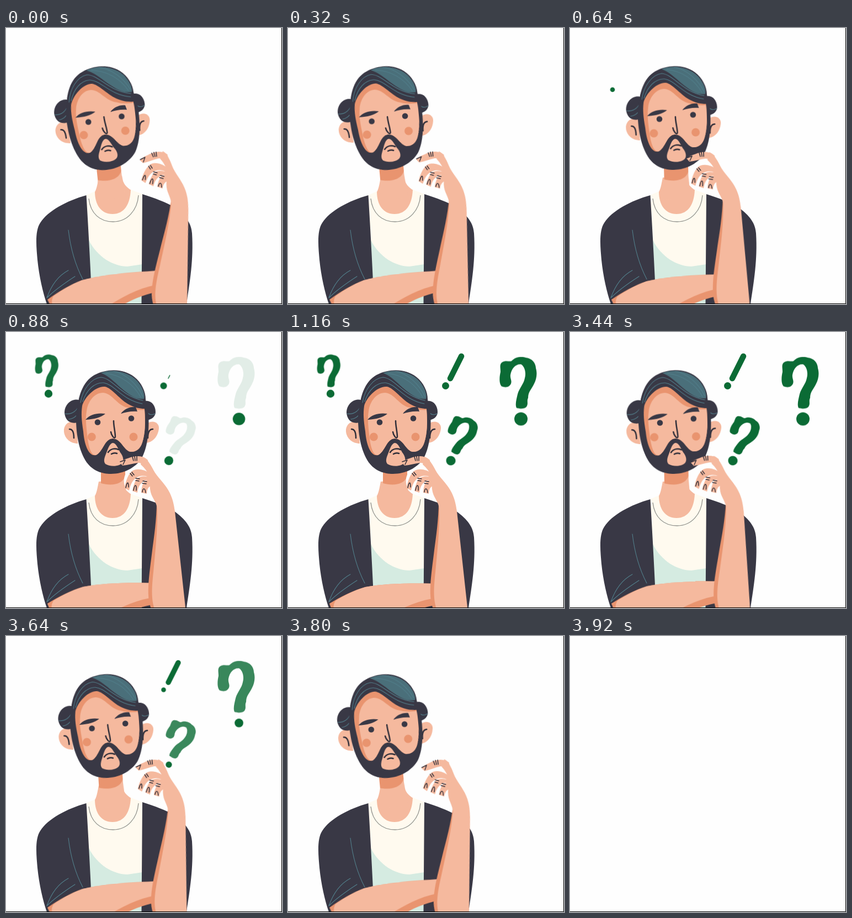
Recreate the animation shown at these times as an HTML page. Size 500 by 500 pixels, loop 3.96 s.

```html
<!DOCTYPE html>
<html lang="en">
<head>
<meta charset="utf-8">
<title>Thinking man</title>
<style>
  html, body { margin: 0; width: 100%; height: 100%; overflow: hidden; background: #fefefe; }
  svg { display: block; width: 100vw; height: 100vh; }

  .dark { fill: #393845; }
  .skin { fill: #f5b99e; }
  .shade { fill: #e9946f; }
  .teal { fill: #4a6f7a; }
  .cream { fill: #fffaef; }
  .mint { fill: #d5ebe1; }
  .green { fill: #0b6b35; }
  .line { fill: none; stroke: #2e2d38; stroke-width: 2.5; stroke-linecap: round; stroke-linejoin: round; }
  .thin { stroke-width: 1.5; }
  .strand { fill: none; stroke: #527f8b; stroke-width: 1.1; stroke-linecap: round; }

  #man, #head, .feature, #arm, #forearm, #index, .pop, .fade, #bar {
    animation: 3.96s infinite cubic-bezier(.42, 0, .58, 1);
  }
  #man { animation-name: cut; animation-timing-function: step-end; }
  #head { animation-name: head; transform-origin: 186px 329px; }
  /* Eyes, brows and mouth stay level while the head tilts */
  .feature { animation-name: level; transform-box: fill-box; transform-origin: center; }
  #arm { animation-name: arm; transform-origin: 75px 490px; }
  #forearm { animation-name: forearm; transform-origin: 288px 526px; }
  #index { animation-name: index; transform-origin: 252px 234px; }

  .pop { animation-name: pop; animation-timing-function: linear; transform-box: fill-box; transform-origin: center; }
  .fade { animation-name: fade; animation-timing-function: linear; }
  .first .pop { animation-name: pop-first; animation-timing-function: ease-out; }
  .first .fade { animation-name: fade-first; }
  #bar { animation-name: bar; transform-origin: 294px 84px; animation-timing-function: linear; }

  @keyframes cut { 0% { visibility: visible; } 98.95%, 100% { visibility: hidden; } }
  @keyframes head { 0%, 2.6%, 100% { transform: rotate(-6deg); } 23%, 81.5% { transform: none; } }
  @keyframes level {
    0%, 2.6%, 100% { transform: translateY(var(--drop, 0px)) rotate(6deg); }
    23%, 81.5% { transform: translateY(0px) rotate(0deg); }
  }
  @keyframes arm { 0%, 9%, 99%, 100% { transform: rotate(-4.6deg); } 25.5%, 79.8% { transform: none; } }
  @keyframes forearm { 0%, 98%, 100% { transform: rotate(7deg); } 22%, 79% { transform: none; } }
  @keyframes index { 0%, 98%, 100% { transform: rotate(-14deg); } 22%, 79% { transform: none; } }
  @keyframes pop-first { 0%, 14.5%, 87%, 100% { transform: scale(0); } 18.5%, 82% { transform: scale(1); } }
  @keyframes fade-first { 0%, 17%, 86%, 100% { opacity: 0; } 22.5%, 81.5% { opacity: 1; } }
  @keyframes pop { 0%, 18.5%, 94.7%, 100% { transform: scale(0); } 22.5%, 90.5% { transform: scale(1); } }
  @keyframes fade { 0%, 21.5%, 96%, 100% { opacity: 0; } 28%, 91% { opacity: 1; } }
  @keyframes bar { 0%, 21.5%, 94%, 100% { transform: scale(0); } 27%, 91.7% { transform: scale(1); } }
</style>
</head>
<body>
<svg viewBox="0 0 500 500">
  <defs>
    <!-- Hook of a question mark, measured from the centre of its dot -->
    <path id="hook" d="M-35,-102 C-28,-107 -21,-103 -17,-105 C-10,-113 2,-114 9,-111
      C20,-110 27,-101 27,-92 C30,-82 28,-72 24,-64 C19,-53 13,-50 13,-38 C10,-32 14,-28 10,-22
      C6,-17 -4,-19 -8,-20 C-11,-26 -8,-36 -6,-45 C-3,-56 5,-63 7,-74 C10,-85 6,-96 0,-99
      C-9,-100 -17,-92 -19,-80 C-20,-73 -16,-70 -18,-64 C-22,-56 -29,-57 -35,-59
      C-40,-64 -39,-77 -37,-85 C-37,-93 -39,-98 -35,-102Z"/>
  </defs>

  <g id="man">
    <path class="skin" d="M161,297 C165,290 166,280 168,271 L210,268 C211,282 219,289 227,294 L230,318 L215,345 L172,345 L156,318Z"/>
    <g id="head">
      <!-- neck -->
      <path class="skin" d="M172,240 L172,272 L170,310 L219,310 L216,268 L216,240Z"/>
      <path class="shade" d="M172,240 L172,274 C190,279 211,277 216,261 L216,240Z"/>
      <!-- ears -->
      <path class="skin" d="M128,164 C115,158 104,168 105,180 C106,193 117,202 130,202Z"/>
      <path class="skin" d="M255,166 C267,158 278,165 277,175 C275,190 266,200 253,201Z"/>
      <path class="line" d="M115,176 C121,176 123,183 123,192 M257,192 C257,182 260,176 266,176"/>
      <!-- side hair -->
      <path class="dark" d="M135,124 C121,118 106,130 106,146 C107,159 115,167 129,164Z"/>
      <path class="dark" d="M249,126 C261,121 271,132 271,145 C271,153 264,159 254,160Z"/>
      <path class="strand" d="M107,148 C119,150 131,143 133,127 M114,158 C126,157 134,146 135,132 M252,133 C252,146 260,153 270,148"/>
      <!-- beard and hair -->
      <path class="dark" d="M127,146 C126,185 132,215 146,236 C158,252 174,257 190,257 C213,257 234,246 245,230 C256,211 260,180 258,148 L250,118 L133,118Z"/>
      <path class="dark" d="M129,150 C129,118 139,90 160,78 C185,65 214,67 232,81 C246,92 253,108 253,122 L257,150Z"/>
      <!-- face -->
      <path class="shade" d="M138,134 C141,121 160,98 179,99 C192,101 207,124 224,132 C234,137 242,139 251,139 C253,165 252,185 247,200 C243,213 234,218 226,217 C213,215 209,193 193,193 C178,194 176,217 163,223 C150,226 142,205 140,180 C137,160 136,148 138,134Z"/>
      <path class="skin" d="M146,144 C148,126 160,110 176,110 C194,112 200,132 220,137 C230,141 242,142 251,141 C253,165 252,185 247,200 C243,213 234,218 226,217 C213,215 209,193 193,193 C178,194 176,217 163,223 C153,224 149,205 147,185 C145,168 144,156 146,144Z"/>
      <path class="skin" d="M194,201 C201,202 203,213 209,221 C214,229 214,238 205,241 C197,244 186,243 180,239 C175,233 180,224 183,216 C186,208 189,201 194,201Z"/>
      <!-- hair sweep -->
      <path class="teal" d="M172,74 C195,66 222,72 238,89 C247,100 252,112 250,121 C235,123 222,113 208,101 C196,90 185,79 172,74Z"/>
      <path class="strand" d="M135,128 C139,104 154,84 172,82 C194,84 208,116 248,124 M139,126 C146,105 160,91 177,92 C197,95 210,123 247,130 M181,75 C210,78 232,96 244,118 M195,71 C218,76 238,95 248,117"/>
      <!-- features -->
      <circle class="shade" cx="155.300" cy="190" r="7.500"/>
      <circle class="shade" cx="231" cy="190" r="7.500"/>
      <circle class="dark feature" style="--drop: 3.7px" cx="166" cy="163.500" r="5.300"/>
      <circle class="dark feature" style="--drop: 7px" cx="227" cy="156.500" r="5.300"/>
      <path class="dark feature" d="M144,159 C152,149 166,146 180,148 C172,155 160,158 144,159Z"/>
      <path class="dark feature" style="--drop: 7px" d="M208,148 C214,140 224,135 235,136 L238,144 C227,143 218,145 208,148Z"/>
      <path class="line" d="M195,161 C195,171 198,181 198,190 C197,195 191,188 190,181"/>
      <path class="line feature" style="--drop: 2.5px" d="M185,218 C189,212 196,210 204,213 M191,221 Q196,218 201,220"/>
    </g>

    <!-- shirt -->
    <path class="cream" d="M145,303 L161,296 C161,320 172,337 193,337 C215,337 225,318 226,293 L248,301 L247,500 L155,500Z"/>
    <path class="mint" d="M150,384 C165,415 195,432 220,432 L247,428 L247,500 L154,500Z"/>
    <path d="M150,309 C153,336 170,351 194,351 C220,351 238,330 240,303" fill="none" stroke="#8f918c" stroke-width="1.300"/>

    <!-- jacket -->
    <path class="dark" d="M145.500,303 C110,313 76,331 62,353 C52,368 55,397 57,420 C60,450 67,480 74,500 L156,500 C153,430 149,360 145.500,303Z"/>
    <path class="dark" d="M247,301 C270,308 290,316 304,324 C326,340 336,354 337,372 C340,420 333,460 327,500 L245.500,500Z"/>
    <path class="strand" d="M113,366 C117,400 127,432 139,455"/>

    <g id="arm">
      <path class="shade" d="M75,492 C95,480 118,468 140,462 C180,455 220,455 285,456 L285,493 C255,495 232,503 214,511 L84,515Z"/>
      <path class="skin" d="M86,487 C102,477 120,468 140,462 C180,455 220,455 285,456 L285,480 C250,482 222,493 190,509 L90,515 C82,505 80,496 86,487Z"/>
    </g>
    <path class="strand" d="M74,489 C82,466 96,448 113,439 M75,488 C90,473 108,461 125,450"/>

    <g id="forearm">
      <path d="M222,250 C209,262 212,285 226,293 C240,298 258,302 272,308 L276,262 L256,243Z" fill="#fefefe"/>
      <!-- forearm and palm -->
      <path class="shade" d="M273,306 C273,340 268,372 265,395 C262,420 259,440 258,460 C257,480 259,495 266,508 L300,508 L290,310Z"/>
      <path class="skin" d="M247,226 C257,229 263,243 270,255 C279,268 290,277 297,292 C303,305 304,313 306,325 L326,508 L272,508 C262,490 264,462 267,435 C270,400 275,360 274,320 C273,308 265,302 262,290 C260,282 260,274 262,265 C258,256 252,247 244,240Z"/>
      <!-- curled fingers -->
      <path class="skin" d="M262,257 C250,248 235,246 227,253 C220,260 216,273 215,283 L223,287 C226,275 230,266 240,262 C249,259 257,261 262,266Z"/>
      <path class="skin" d="M263,264 C253,260 241,261 236,267 C232,274 230,281 229,288 L238,291 C239,281 243,274 250,270 C256,267 260,268 264,270Z"/>
      <path class="skin" d="M266,267 C258,266 251,269 248,275 C246,281 245,286 245,291 L255,293 C255,285 258,279 267,277Z"/>
      <path class="line thin" d="M217,282 C219,272 222,269 222,281 M231,287 C233,275 237,275 236,287 M247,290 C248,282 252,282 253,291"/>
      <path class="line thin" d="M225,256 l4,5 M228,254 l4,5 M235,265 l7,1 M235,269 l6,1 M248,270 l7,1 M247,274 l7,1"/>
      <g id="index">
        <path class="skin" d="M257,232 C249,224 237,224 229,226 C220,229 212,231 206,236 L211,242 C221,241 231,238 240,237 C246,237 251,241 255,247Z"/>
        <path class="line thin" d="M207,235 L216,232 L212,240 M229,226 l2,7 M233,225 l1,8 M237,225 l0,8"/>
      </g>
    </g>
  </g>

  <g class="green">
    <g class="first" transform="translate(77 111.700)">
      <use class="fade" href="#hook" transform="scale(.63)"/>
      <circle class="pop" r="7.200"/>
    </g>
    <g transform="translate(422 157.500)">
      <use class="fade" href="#hook"/>
      <circle class="pop" r="12"/>
    </g>
    <g transform="translate(295 233) rotate(25) scale(.75)">
      <use class="fade" href="#hook"/>
      <circle class="pop" r="11.500"/>
    </g>
    <path id="bar" d="M314,44 L294,84" stroke="#0b6b35" stroke-width="10.500" stroke-linecap="round"/>
    <circle class="pop" cx="285.500" cy="97.500" r="6.500"/>
  </g>

  <path d="M499.500,0 V499.500 H0" fill="none" stroke="#000"/>
</svg>
</body>
</html>
```
